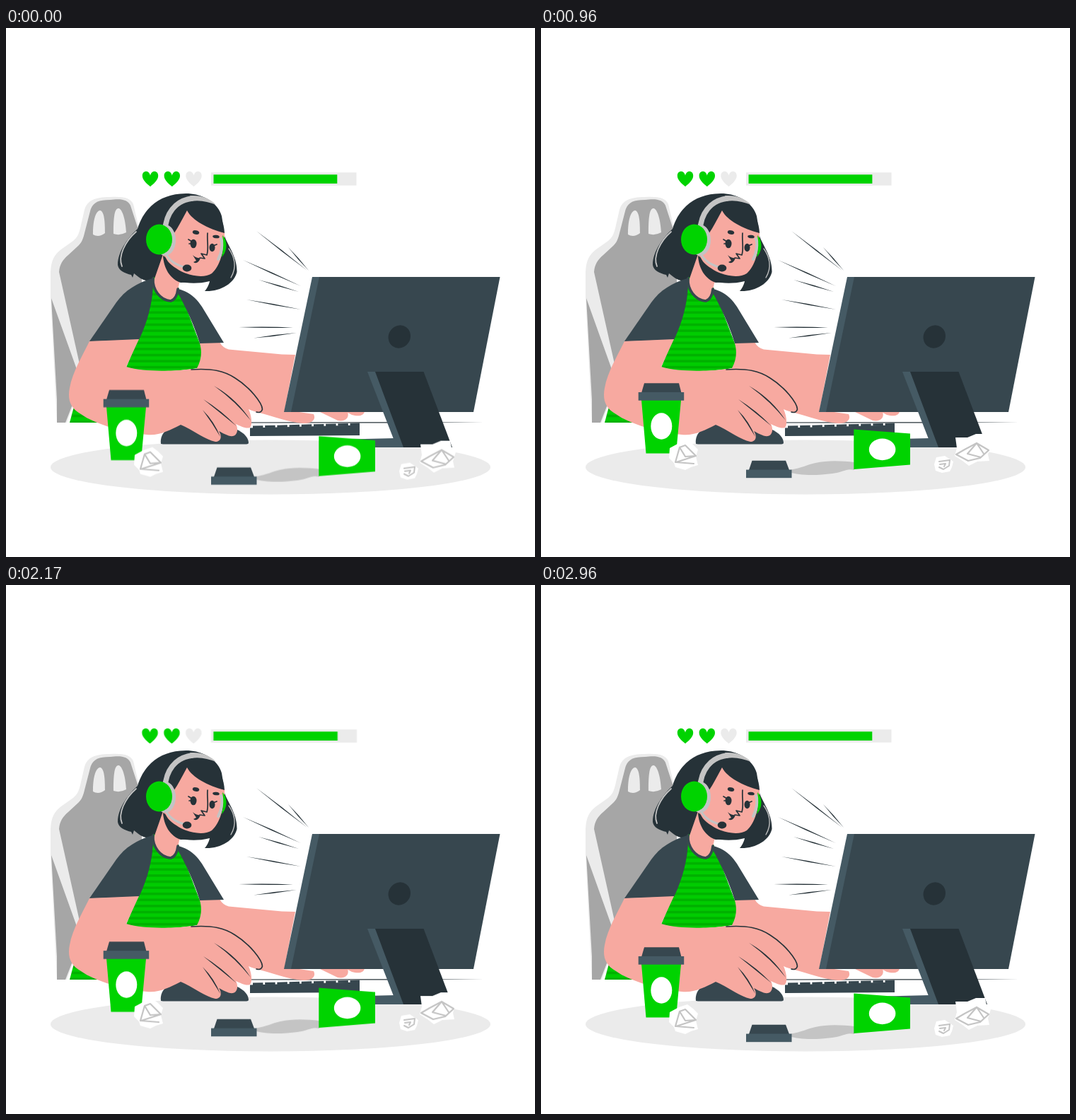
An HTML page for the animation above (3 s loop, 748x748 px).

```html
<!DOCTYPE html>
<html lang="en">
<head>
<meta charset="utf-8">
<title>Gamer at the desk</title>
<style>
  html, body { margin: 0; width: 100%; height: 100%; overflow: hidden; background: #fff; }
  svg { display: block; width: 100vw; height: 100vh; }
  .green { fill: #00d300; }
  .pale { fill: #ebebeb; }
  .gray { fill: #a6a6a6; }
  .ink { fill: #263238; }
  .slate { fill: #37474f; }
  .steel { fill: #455a64; }
  .skin { fill: #f7a9a0; }
  .white { fill: #fff; }
  .line { fill: none; stroke: #263238; stroke-width: 1.7; stroke-linecap: round; stroke-linejoin: round; }
  .band { fill: none; stroke: #c4c4c4; stroke-linecap: round; stroke-linejoin: round; }
  .float { animation: float 3s linear -40ms infinite; }
  .hud { transform-origin: 344.25px 213.4px; animation: beat 3s linear -2040ms infinite; }
  @keyframes float {
    0%, 100% { transform: translateY(0); }
    50% { transform: translateY(-15px); }
  }
  @keyframes beat {
    0%, 30%, 40%, 60%, 100% { transform: scale(1); }
    10%, 50% { transform: scale(1.1); }
  }
</style>
</head>
<body>
<svg viewBox="0 0 748 748" xmlns="http://www.w3.org/2000/svg">
  <defs>
    <pattern id="stripes" width="20" height="8.6" patternUnits="userSpaceOnUse">
      <rect width="20" height="8.6" fill="#00cc00"/>
      <rect y="5" width="20" height="3.4" fill="#00b000"/>
    </pattern>
    <path id="heart" d="M0 10.7C-5 6.5-11.2 1.5-11.2-4.5C-11.2-8.5-8.8-10.7-6-10.7C-2.8-10.7-.6-8-0-4.8C.6-8 2.8-10.7 6-10.7C8.8-10.7 11.2-8.5 11.2-4.5C11.2 1.5 5 6.5 0 10.7Z"/>
  </defs>

  <ellipse class="pale" cx="374" cy="621" rx="311" ry="38.5"/>

  <!-- chair -->
  <path class="pale" d="M72 558L63 380V345C64 328 68 321 78 313L95 301C101 296 103 291 105 283L111 257C115 244 125 239 147 239C166 238 176 240 180 249L192 300V480L110 520L86 558Z"/>
  <path class="gray" d="M75 345C76 334 80 328 88 321L101 309C107 304 109 298 111 290L119 259C122 247 130 243 147 243C164 241 172 243 176 251L192 300V460L112 490L106 484Z"/>
  <path class="gray" d="M64 382L102 488L95 530L84 558H72V525Z"/>
  <path class="pale" d="M123 292C123 274 126 259 133 258C139 259 140 274 140 290Q131 297 123 292ZM152 291C152 270 153 255 159 255C165 256 169 272 170 289Q161 294 152 291Z"/>
  <path d="M97 532L90 558H140V530Z" fill="url(#stripes)"/>
  <path d="M96 533L87 558" fill="none" stroke="#fff" stroke-width="2"/>
  <path class="ink" d="M300 557.4L560 557.2L675 557.8L560 558.4L300 558.4Z"/>

  <!-- hair behind the head -->
  <path class="ink" d="M246 234.5C274 231 299 245 305 266C307 276 307 284 308 291C312 306 327 322 326.500 345C323 361 303 373 281 372C284 369 287 363 288 358C272 362 258 361 246 359L226 346L214 357C204 360 193 357 186 351L181 347L179 353L177 349C168 347 159 343 158 335C158 315 174 295 186 284C195 254 217 237 246 234.500Z"/>
  <path class="band" d="M184 288C168 302 158 323 164 337" stroke-width="1.800"/>
  <path class="band" d="M315 312C323 323 327 338 318 353" stroke="#fff" stroke-width="1.300"/>

  <!-- far arm and fingers -->
  <path class="skin" d="M268 446L302 444Q306 452 315 454.500L390 461.500L409 462L394 540L435 546C439 554 432 560 420 559C397 557 375 548 358 544L270 500Z"/>
  <path class="skin" d="M440 541L483 543C486 551 480 557 469 555ZM478 541H507C507 548 499 550 489 547Z"/>

  <!-- shirt and neck -->
  <path d="M208 352C206 398 184 447 170 480C199 488 240 486 270 481C277 468 277 456 274 446L244 367Z" fill="url(#stripes)"/>
  <path class="skin" d="M222 320L207 363C211 376 221 385 232 385C238 384 242 377 245 361L252 346Z"/>
  <path class="line" d="M208 354C207 370 218 385 233 386C239 384 242 378 243 369" style="stroke:#37474f;stroke-width:3.500"/>
  <path class="slate" d="M207 354C186 360 168 371 156 388L118 443L188 441C199 418 208 388 208 360Z"/>
  <path class="slate" d="M243 369C257 372 268 380 277 394L308 445L274 446C266 420 254 394 242 373Z"/>

  <!-- head -->
  <path class="ink" d="M222 322C223 340 232 355 247 360L282 358L242 334Z"/>
  <path class="skin" d="M224 318L241 276L256 257L309 288C310 310 303 337 291 347C279 355 255 350 241 340C231 334 225 327 224 318Z"/>
  <path class="ink" d="M228 302C238 293 246 276 256 258C263 272 286 284 309 290C308 263 290 244 262 242C240 244 227 263 228 302Z"/>
  <path class="band" d="M304 298C307 306 305 318 300 327" stroke-width="4"/>
  <path class="green" d="M306 293C313 300 314 315 305 324Q309 308 306 293Z"/>
  <path class="band" d="M225 286C226 263 239 244 263 241" stroke-width="7.500"/>
  <path d="M260 237.300C274 236 287 240 297 250C286 246 275 243 262 245Z" fill="#c4c4c4"/>
  <ellipse cx="225" cy="300" rx="15" ry="22" fill="#c4c4c4"/>
  <ellipse class="green" cx="216.500" cy="299" rx="18.500" ry="21.500"/>
  <path class="band" d="M226 319C231 329 240 335 252 338" stroke-width="3"/>
  <ellipse class="ink" cx="256" cy="339.500" rx="6.300" ry="5"/>
  <g class="ink">
    <ellipse cx="265" cy="305" rx="4.500" ry="6.300"/>
    <ellipse cx="291.500" cy="310.500" rx="4" ry="5.800"/>
    <ellipse cx="268.500" cy="289" rx="4.800" ry="2.800" transform="rotate(12 268.500 289)"/>
    <ellipse cx="297" cy="295" rx="4.800" ry="2.300" transform="rotate(5 297 295)"/>
    <path d="M264 321C268 325 273 326 275 325C273 331 269 334 265 331L269 329Z"/>
  </g>
  <path class="line" d="M285 290C284 302 287 311 284 321L276 319L281 326L274 325M263 302L258 299M262 305L259 305M293 308L298 306"/>

  <!-- mouse, near arm -->
  <path class="slate" d="M219 588C217 572 230 564 247 558L325 567C338 573 343 580 343 587Q342 588.500 338 588.500H222Z"/>
  <path class="skin" d="M118 443L188 440L170 479C200 488 247 484 265 482C288 481 309 485 324 495C345 508 363 530 363 540C362 546 352 543 343 539C347 548 349 560 345 565C339 567 332 563 325 560C329 567 327 576 321 577C315 578 307 573 301 570C306 577 304 585 296 585C279 581 264 568 247 561C231 569 216 577 199 575C168 572 125 560 106 546C90 537 87 524 90 509C94 486 109 462 118 443Z"/>
  <path class="line" d="M262 483C292 481 309 485 324 495C345 508 362 530 362.500 539Q361 545 354 543"/>
  <g id="folds" class="ink"></g>

  <!-- keyboard -->
  <path class="slate" d="M345 565.500L500 561.500V576L345 577Z"/>
  <path d="M349 564.300L500 560.300" fill="none" stroke="#37474f" stroke-width="3.500" stroke-dasharray="14.500 2.700"/>

  <!-- monitor -->
  <path class="steel" d="M433 352H445L405 543H393Z"/>
  <path class="slate" d="M443 352H698.500L661 543H403Z"/>
  <ellipse class="ink" cx="556.300" cy="436.500" rx="15.300" ry="16.500" transform="rotate(35 556.300 436.500)"/>
  <path class="steel" d="M511 486H524L566 593H522V581H548Z"/>
  <path class="steel" d="M490 581.500L550 580L560 593H522Z"/>
  <path class="ink" d="M522 486H590.500L631 593H562Z"/>
  <g id="rays" class="ink"></g>

  <!-- hearts and life bar -->
  <g class="hud">
    <use href="#heart" class="green" x="204" y="213.500"/>
    <use href="#heart" class="green" x="234.800" y="213.500"/>
    <use href="#heart" class="pale" x="265.500" y="213.500"/>
    <rect class="pale" x="290" y="204.300" width="205.500" height="18.400"/>
    <rect class="green" x="293.500" y="207.300" width="174.800" height="12.600"/>
  </g>

  <!-- floating litter -->
  <g class="float">
    <path d="M351 635C370 632 377 627 388 625C405 621 426 622 443 624V635C432 632 428 638 412 640C390 643 365 643 351 638Z" fill="#c4c4c4"/>

    <path class="green" d="M142 536H198L191 611.400H148.500Z"/>
    <path class="slate" d="M146 512.300H195L198.500 526H142Z"/>
    <rect class="steel" x="137.700" y="525" width="64.500" height="11.700"/>
    <ellipse class="white" cx="170.300" cy="573" rx="15" ry="18.800"/>

    <path class="slate" d="M298.500 621.700H346L351 635H294Z"/>
    <rect class="steel" x="290" y="634.600" width="64.500" height="11.600"/>

    <path class="green" d="M442.300 577.500L522 583.500V627.500L442.300 634Z"/>
    <ellipse class="white" cx="482.600" cy="605.900" rx="18.800" ry="15.300"/>

    <path class="white" d="M195 597L207 593L215 599L222 606L219 616L222 628L212 631L204 635L190 631L188 625L181 618L182 604Z"/>
    <path class="band" d="M190 624L196 603L204 600L219 615L191 624L216 626M196 603L204 616L219 615" stroke-width="2.200"/>

    <path class="white" d="M559 617L571 615L577 619L583 623L581 631L578 637L567 639L558 636L556 627Z"/>
    <path class="band" d="M563 623L578 621L577 629L569 634L563 631M564 627L572 626L570 630" stroke-width="2"/>

    <path class="white" d="M586 589L603 589L615 584L628 584L630 594L636 600L632 613L634 622L617 623L605 629L596 622L585 615L588 604Z"/>
    <path class="band" d="M587 613L599 606L616 597L633 607L621 618L604 622L587 613M616 597L603 612L622 617M616 597L626 612" stroke-width="2.200"/>
  </g>
</svg>
<script>
  // Lens-shaped stroke, pointed at both ends; bend shifts the middle sideways.
  function lens(x1, y1, x2, y2, width, bend = 0) {
    const dx = x2 - x1, dy = y2 - y1, len = Math.hypot(dx, dy);
    const mid = k => `${(x1 + x2) / 2 + dy / len * k} ${(y1 + y2) / 2 - dx / len * k}`;
    return `<path d="M${x1} ${y1}Q${mid(bend + width)} ${x2} ${y2}Q${mid(bend - width)} ${x1} ${y1}Z"/>`;
  }
  const draw = (id, rows) => {
    document.getElementById(id).innerHTML = rows.map(r => lens(...r)).join("");
  };
  draw("rays", [
    [354, 287, 426, 343, 1.5], [399, 310, 428, 343, 1.5], [335, 328, 417, 365, 1.6],
    [357, 356, 414, 373, 1.6], [340, 384, 417, 398, 1.6], [329, 423, 406, 423.5, 1.6],
    [350, 438.5, 411, 431, 1.6]
  ]);
  draw("folds", [
    [294, 506, 346, 555, 1.8, 7], [279, 525, 326, 563, 1.8, 2], [278, 540, 303, 578, 1.8, 3]
  ]);
</script>
</body>
</html>
```
